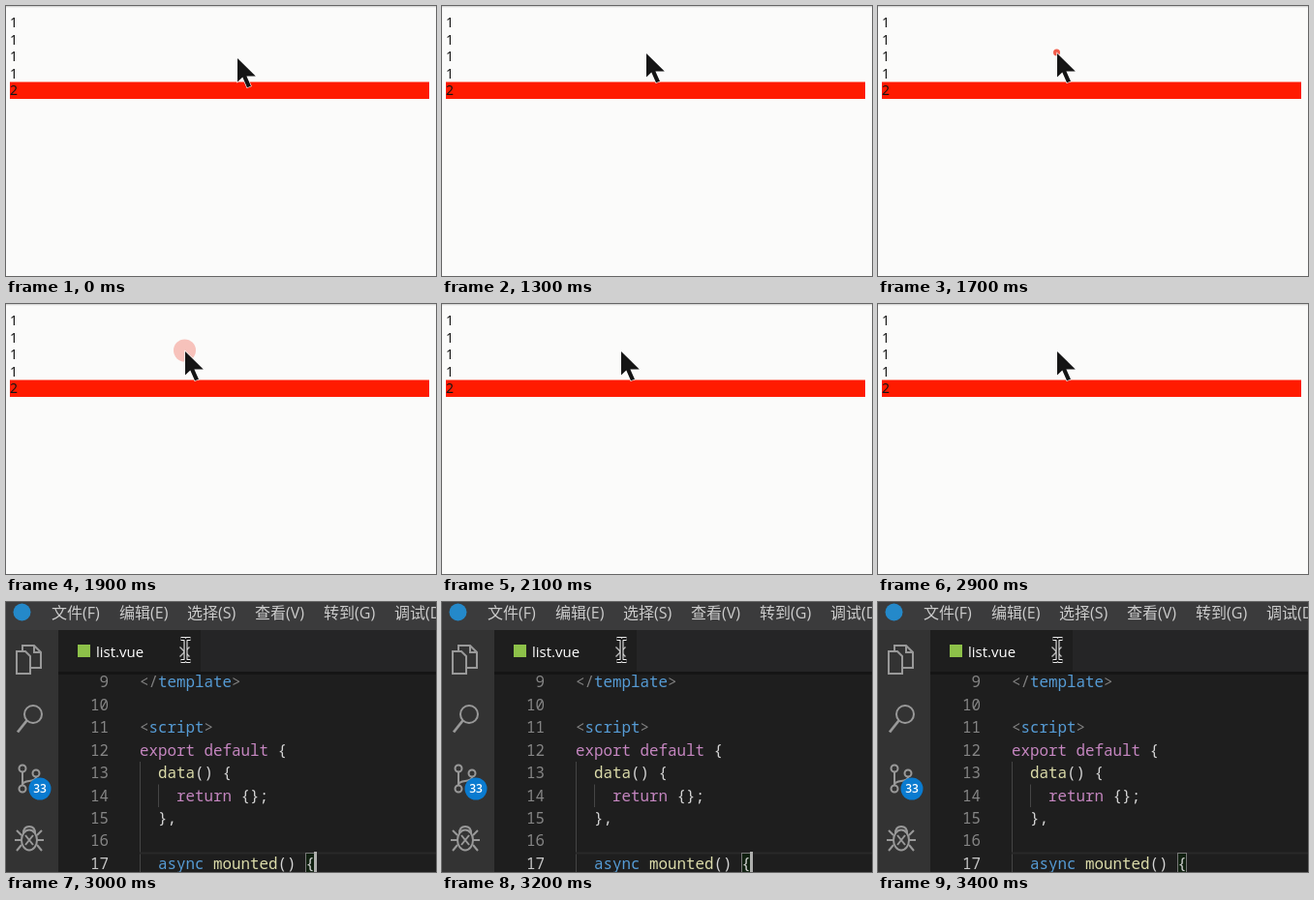
These frames come from a looping animation (444x279 px, 3.9 s). An HTML page:

```html
<!DOCTYPE html>
<html lang="zh">
<head>
<meta charset="utf-8">
<style>
  html, body { margin: 0; width: 100%; height: 100%; overflow: hidden; background: #fbfbfa; }
  svg { display: block; width: 444px; height: 279px; }
  text { white-space: pre; }
  .page { font: 14px "Noto Sans", "Open Sans", sans-serif; fill: #151515; }
  .ui { font-family: "Open Sans", "Noto Sans CJK SC", "Noto Sans CJK", sans-serif; }
  .code { font: 15.85px "Noto Sans Mono", "DejaVu Sans Mono", monospace; }
  .icon { fill: none; stroke: #999; stroke-width: 2; }
  .hidden { display: none; }
</style>
</head>
<body>
<svg viewBox="0 0 444 279">
  <g id="page" class="page">
    <rect width="444" height="279" fill="#fbfbfa"/>
    <rect width="444" height="1.3" fill="#d6d6d6"/>
    <rect x="4" y="78.5" width="433" height="17.5" fill="#ff1b00"/>
    <g id="rows"></g>
    <circle id="ripple" cx="184.5" cy="48" fill="#f0402a"/>
    <path id="arrow" d="M0 0V24.5L5.3 19.6L10 30.3L14 28.7L9.4 18.4H18.8Z" stroke="#fff" stroke-width="1.2" paint-order="stroke"/>
  </g>

  <g id="editor">
    <rect width="444" height="279" fill="#1e1e1e"/>
    <rect width="54" height="279" fill="#333"/>
    <rect x="54" y="29" width="390" height="43" fill="#252526"/>
    <rect x="54" y="29" width="147" height="43" fill="#1e1e1e"/>
    <rect width="444" height="29" fill="#3b3b3c"/>
    <rect x="54" y="72" width="390" height="3" fill="#151515"/>
    <circle cx="16.5" cy="10.5" r="9" fill="#2489ca"/>
    <g id="menu" class="ui" font-size="16" fill="#ccc"></g>

    <rect x="74" y="44" width="13" height="13" fill="#8dc149"/>
    <text class="ui" x="93" y="57" font-size="15" fill="#fff">list.vue</text>
    <path d="M179.500 46.500l10 10m0-10l-10 10" stroke="#bbb" stroke-width="1.4"/>

    <g class="icon">
      <path d="M17 51V45H29L36 52V68H24M29 45V52H36M11 51H20L25 56V74H11Z"/>
      <circle cx="28" cy="116" r="9"/>
      <path d="M21.500 122.500L12 134.500" stroke-width="2.800"/>
      <circle cx="17" cy="172" r="3.500"/>
      <circle cx="17" cy="193" r="3.500"/>
      <circle cx="31" cy="177" r="3.500"/>
      <path d="M17 176V189M31 181C31 187 17 183 17 189"/>
      <ellipse cx="24" cy="246" rx="8" ry="10.500"/>
      <path d="M18 239Q18 232 24 232T30 239M16 241L11 236M32 241L37 236M16 246H9M32 246H39M16 251L11 257M32 251L37 257M20 241L28 251M28 241L20 251"/>
    </g>
    <circle cx="35" cy="193" r="11.500" fill="#0a7bd0"/>
    <text class="ui" x="35" y="197.300" font-size="12" font-weight="600" text-anchor="middle" fill="#fff">33</text>

    <path d="M138.500 165V279M157.500 188.500V212" stroke="#454545"/>
    <path d="M138 259.500H444" stroke="#292929" stroke-width="2"/>
    <rect x="309.500" y="259.500" width="9" height="22" fill="#102010" stroke="#777"/>
    <g id="code" class="code"></g>
    <rect id="caret" x="318" y="258" width="3" height="21" fill="#aeafad"/>
    <path d="M180.500 38H184L185.500 39L187 38H190.500M185.500 39V60M180.500 61H184L185.500 60L187 61H190.500" fill="none" stroke="#eee" stroke-width="4"/>
    <path d="M180.500 38H184L185.500 39L187 38H190.500M185.500 39V60M180.500 61H184L185.500 60L187 61H190.500" fill="none" stroke="#111" stroke-width="1.800"/>
  </g>
</svg>
<script>
const $ = id => document.getElementById(id);

function addText(parent, x, y, parts, attrs = {}) {
  const ns = "http://www.w3.org/2000/svg";
  const text = document.createElementNS(ns, "text");
  Object.entries({ x, y, ...attrs }).forEach(([k, v]) => text.setAttribute(k, v));
  for (const [string, fill] of parts) {
    const span = document.createElementNS(ns, "tspan");
    span.textContent = string;
    if (fill) span.setAttribute("fill", fill);
    text.append(span);
  }
  parent.append(text);
}

[..."11112"].forEach((n, i) => addText($("rows"), 4, 22 + i * 17.6, [[n]]));

const menu = [["文件(F)", 47], ["编辑(E)", 117], ["选择(S)", 187], ["查看(V)", 257], ["转到(G)", 328], ["调试(D)", 401]];
menu.forEach(([label, x]) => addText($("menu"), x, 16.5, [[label]]));

const gray = "#808080", blue = "#569cd6", pink = "#c586c0", yellow = "#dcdcaa", plain = "#d4d4d4";
const lines = [
  [["</", gray], ["template", blue], [">", gray]],
  [],
  [["<", gray], ["script", blue], [">", gray]],
  [["export default", pink], [" {", plain]],
  [["  data", yellow], ["() {", plain]],
  [["    return", pink], [" {};", plain]],
  [["  },", plain]],
  [],
  [["  async ", blue], ["mounted", yellow], ["() {", plain]]
];
lines.forEach((parts, i) => {
  const y = 88.3 + i * 23.45;
  const number = i + 9;
  addText($("code"), 106, y, [[number, number === 17 ? "#c6c6c6" : "#858585"]], { "text-anchor": "end" });
  addText($("code"), 138, y, parts);
});

const show = (id, on) => $(id).classList.toggle("hidden", !on);
const start = performance.now();

function draw() {
  const t = Math.max(0, performance.now() - start) % 3900;
  show("page", t < 3000);
  show("editor", t >= 3000);
  show("caret", t < 3400);

  const [x, y] = t < 1300 ? [239, 54] : t < 1400 ? [211, 49] : [185, 49];
  $("arrow").setAttribute("transform", `translate(${x} ${y})`);

  // The click ring spreads and fades in 100 ms steps.
  const step = Math.floor((t - 1700) / 100);
  show("ripple", step >= 0 && step < 4);
  $("ripple").setAttribute("r", Math.max(0, 3.5 + step * 4));
  $("ripple").setAttribute("opacity", 0.85 * (1 - step / 4) ** 1.5 || 0);
  requestAnimationFrame(draw);
}
draw();
</script>
</body>
</html>
```
